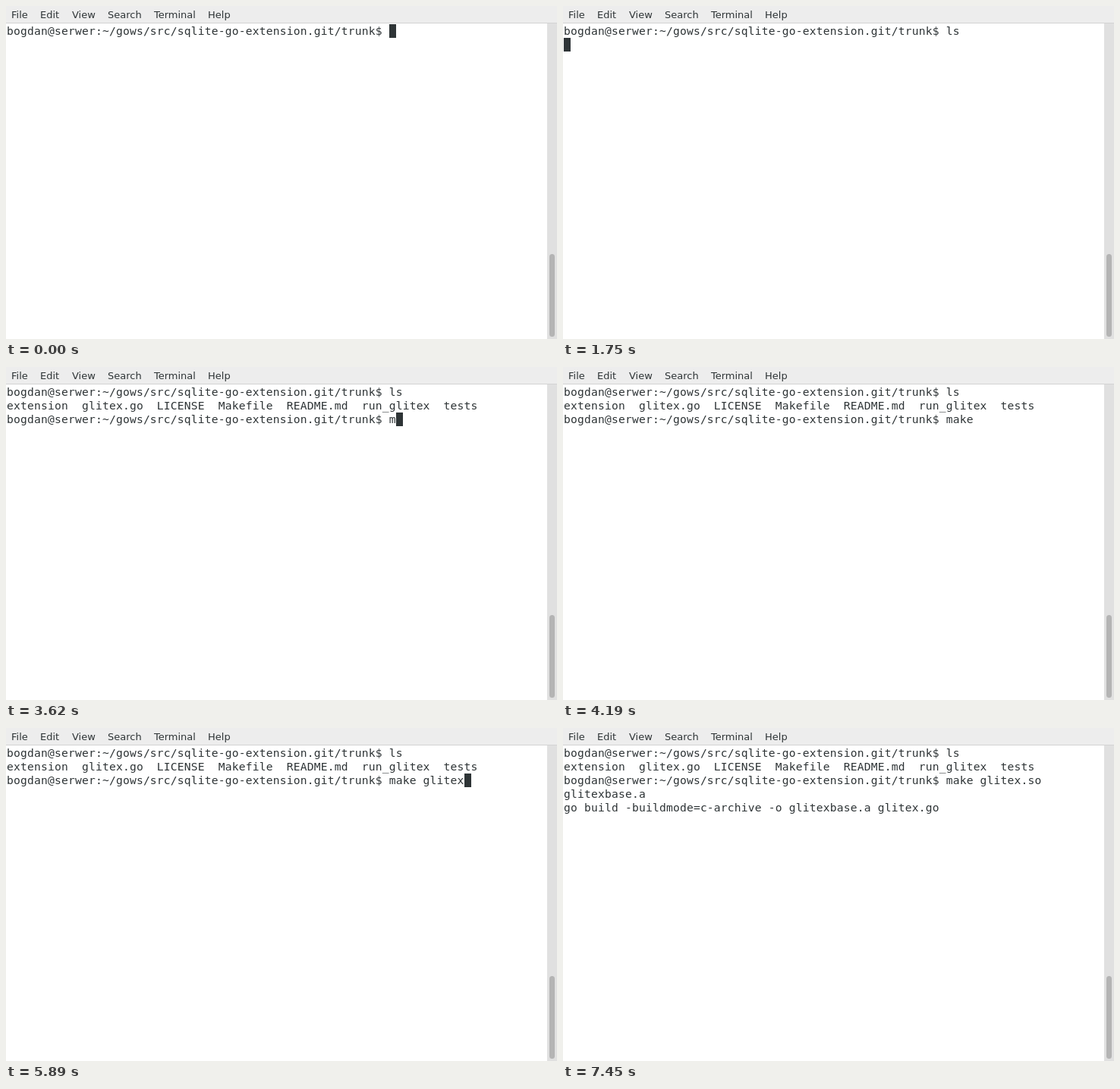
Recreate the animation shown at these times as an HTML page. Size 726 by 439 pixels, loop 8000 ms.

```html
<!DOCTYPE html>
<html lang="en">
<head>
<meta charset="utf-8">
<title>Terminal session</title>
<style>
  html, body { margin: 0; width: 100%; height: 100%; overflow: hidden; background: #fff; }
  svg { display: block; width: 726px; height: 439px; }
  text { fill: #2e3436; white-space: pre; }
  .menu { font: 13px "DejaVu Sans", sans-serif; }
  .term { font: 14.667px "DejaVu Sans Mono", monospace; letter-spacing: 0.17px; }
</style>
</head>
<body>
<svg viewBox="0 0 726 439">
  <rect width="726" height="439" fill="#fff"/>
  <rect width="726" height="22" fill="#ededed"/>
  <rect y="22" width="726" height="1" fill="#d3d3d3"/>
  <rect x="713" y="23" width="13" height="416" fill="#e0e0e0"/>
  <rect x="716" y="327" width="7" height="109" rx="3.5" fill="#b4b4b4"/>
  <g id="menu" class="menu"></g>
  <g id="lines" class="term"></g>
  <rect id="cursor" width="9" height="18" fill="#2e3436"/>
</svg>
<script>
const LOOP = 8000, CELL_W = 9, CELL_H = 18, LEFT = 1, TOP = 24, ASCENT = 14;
const PROMPT = "bogdan@serwer:~/gows/src/sqlite-go-extension.git/trunk$ ";
const LISTING = "extension  glitex.go  LICENSE  Makefile  README.md  run_glitex  tests";
const MAKE = "make glitex.so";
const BUILD = ["glitexbase.a", "go build -buildmode=c-archive -o glitexbase.a glitex.go"];

// When each character of a command appears.
const LS_KEYS = [1290, 1440];
const MAKE_KEYS = [3620, 3790, 3980, 4190, 4500, 4780, 5020, 5230, 5470, 5610, 5890, 6090, 6380, 6610];

const svgEl = (tag, parent, attrs) => {
  const el = document.createElementNS("http://www.w3.org/2000/svg", tag);
  for (const name in attrs) el.setAttribute(name, attrs[name]);
  return parent.appendChild(el);
};

const menu = document.getElementById("menu");
const menuItems = { File: 7, Edit: 45, View: 87, Search: 134, Terminal: 195, Help: 266 };
for (const label in menuItems) {
  svgEl("text", menu, { x: menuItems[label], y: 16 }).textContent = label;
}

const lineGroup = document.getElementById("lines");
const rows = Array.from({ length: 5 }, (_, i) =>
  svgEl("text", lineGroup, { x: LEFT, y: TOP + i * CELL_H + ASCENT }));
const cursor = document.getElementById("cursor");

const typed = (command, keys, t) => command.slice(0, keys.filter(k => k <= t).length);

function screenAt(t) {
  const lines = [PROMPT + typed("ls", LS_KEYS, t)];
  if (t >= 1750) lines.push(t < 1850 ? "" : LISTING);
  if (t >= 1850) lines.push(t < 1950 ? "" : PROMPT + typed(MAKE, MAKE_KEYS, t));
  if (t >= 7450) lines.push(...BUILD);
  else if (t >= 7350) lines.push("");
  return lines;
}

// The cursor is in its blink-off phase during these spans.
const cursorHidden = t => (t >= 3790 && t < 5470) || t >= 7450;

function draw(t) {
  const lines = screenAt(t);
  rows.forEach((row, i) => {
    const line = lines[i] || "";
    if (row.textContent !== line) row.textContent = line;
  });
  const last = lines.length - 1;
  cursor.setAttribute("x", LEFT + lines[last].length * CELL_W);
  cursor.setAttribute("y", TOP + last * CELL_H);
  cursor.setAttribute("visibility", cursorHidden(t) ? "hidden" : "visible");
}

const start = performance.now();
function tick() {
  draw((performance.now() - start) % LOOP);
  requestAnimationFrame(tick);
}
tick();
</script>
</body>
</html>
```
